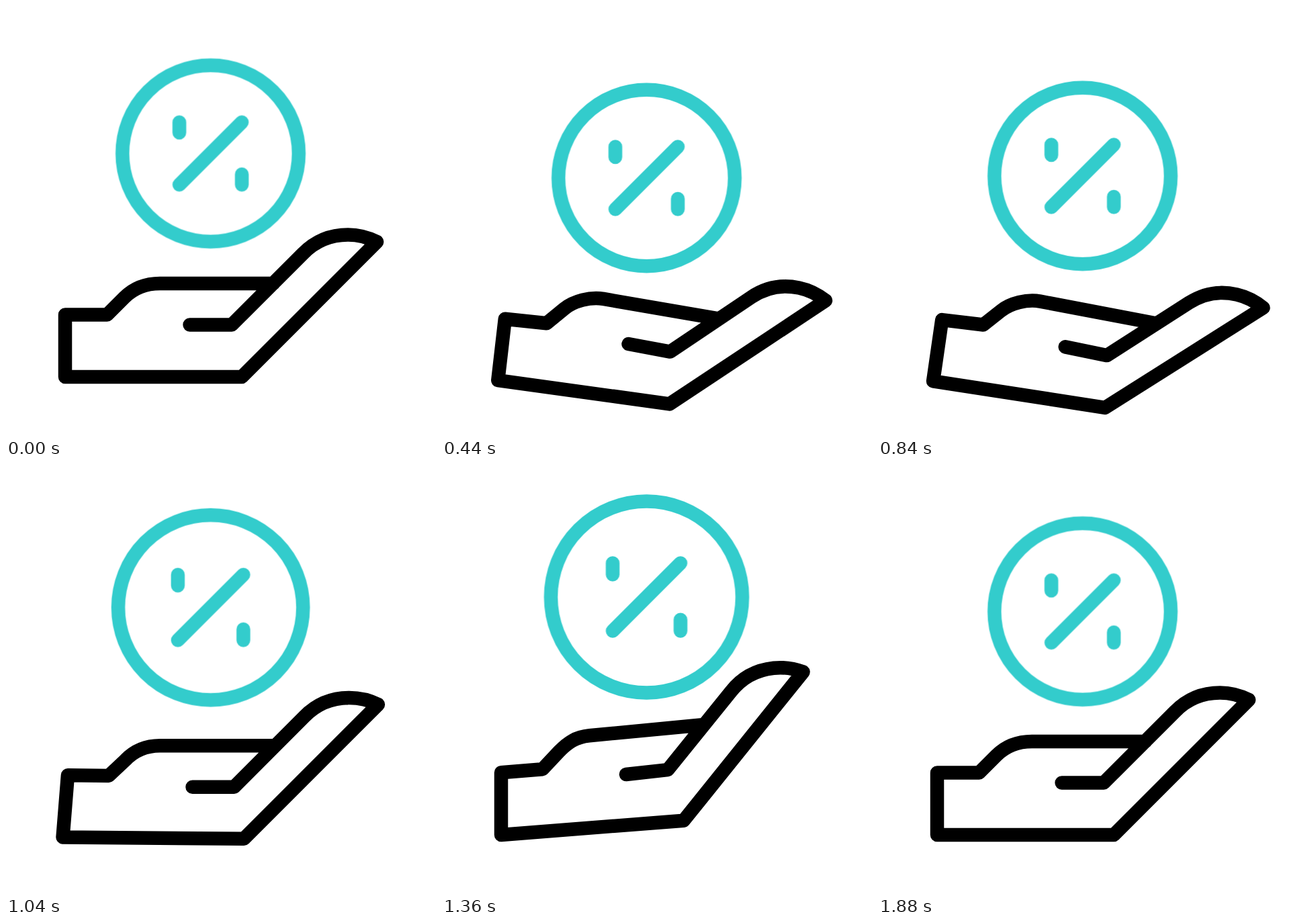
Write an HTML page without scripts that moves like this. It is 640 px wide and 640 px high and loops after 2 s.

```html
<!DOCTYPE html>
<html lang="en">
<head>
<meta charset="utf-8">
<title>Percent coin over a hand</title>
<style>
  html, body { margin: 0; width: 100%; height: 100%; overflow: hidden; background: #fff; }
  svg { display: block; width: 100vw; height: 100vh; }

  path, circle {
    fill: none;
    stroke-width: 20.5;
    stroke-linecap: round;
    stroke-linejoin: round;
    vector-effect: non-scaling-stroke;
  }
  .hand { stroke: #000; animation: tilt 2s infinite; }
  .coin { stroke: #3cc; }
  .drop { animation: drop 2s infinite; }
  .swell { animation: swell 2s infinite; }

  @keyframes drop {
    0%, 2% { transform: translateY(0); animation-timing-function: cubic-bezier(.333, 0, .667, 1); }
    32.5% { transform: translateY(50px); animation-timing-function: cubic-bezier(.4, 0, .6, 1); }
    62% { transform: translateY(-24px); animation-timing-function: cubic-bezier(.333, 0, .667, 1); }
    92%, 100% { transform: translateY(0); }
  }

  @keyframes swell {
    0%, 42% { transform: scale(1); animation-timing-function: cubic-bezier(.4, .1, .7, .61); }
    52% { transform: scale(1.048); animation-timing-function: cubic-bezier(.25, .48, .6, 1); }
    65% { transform: scale(1.09); animation-timing-function: cubic-bezier(.35, 0, .3, 1); }
    90%, 100% { transform: scale(1); }
  }

  /* poses: rest, dipped, passing level, raised, rest */
  @keyframes tilt {
    0%, 2% {
      d: path("M398 413L229 413C209 413 190 420 176 434L150.5 459.5L88 459.5L88 552L351 552L552 351C538 344 524 340.5 509 340.5C483 340.5 460 350 442 368.5L336 474.5L273.5 474.5");
      animation-timing-function: cubic-bezier(.333, 0, .667, 1);
    }
    32.5% {
      d: path("M416 485L244.5 444.5C225 440 198.5 446 184 457L157.5 477L96 468L81.5 559L334 607.5L578 471C566.4 460.4 554 453.2 539.6 449C514.6 441.8 490 444.6 467.5 457.4L341 529.5L279 513.7");
      animation-timing-function: cubic-bezier(.58, 0, .78, .62);
    }
    52% {
      d: path("M401 419.5L229 419.5C209 419.5 191 427 177.5 441L153 464L92 463.3L84.5 555.5L354 558L554 358.5C540 351.5 526 348.5 511 348.5C485 348.5 462 358 444 376.5L339.5 481L277.5 481");
      animation-timing-function: cubic-bezier(.2, .42, .5, 1);
    }
    63.5% {
      d: path("M389.4 385L218.2 403.3C198.2 405.4 186.8 414 173.8 427.5L149.4 453.6L88 459.2L88 552L360.7 528.2L535.8 304.6C521 299.3 506.7 297.5 491.8 299.4C466 302.5 444.2 314.7 428.6 335.2L336 452.9L274 460.5");
      animation-timing-function: cubic-bezier(.35, 0, .3, 1);
    }
    90%, 100% {
      d: path("M398 413L229 413C209 413 190 420 176 434L150.5 459.5L88 459.5L88 552L351 552L552 351C538 344 524 340.5 509 340.5C483 340.5 460 350 442 368.5L336 474.5L273.5 474.5");
    }
  }
</style>
</head>
<body>
<svg viewBox="0 0 640 640">
  <path class="hand" d="M398 413L229 413C209 413 190 420 176 434L150.5 459.5L88 459.5L88 552L351 552L552 351C538 344 524 340.5 509 340.5C483 340.5 460 350 442 368.5L336 474.5L273.5 474.5"/>
  <g class="coin" transform="translate(304.5 219.5)">
    <g class="drop">
      <g class="swell">
        <circle r="131.25"/>
        <path d="M-46.5 46.5L46.5 -46.5M-46.5 -46.5V-31M46.5 31V46.5"/>
      </g>
    </g>
  </g>
</svg>
</body>
</html>
```
